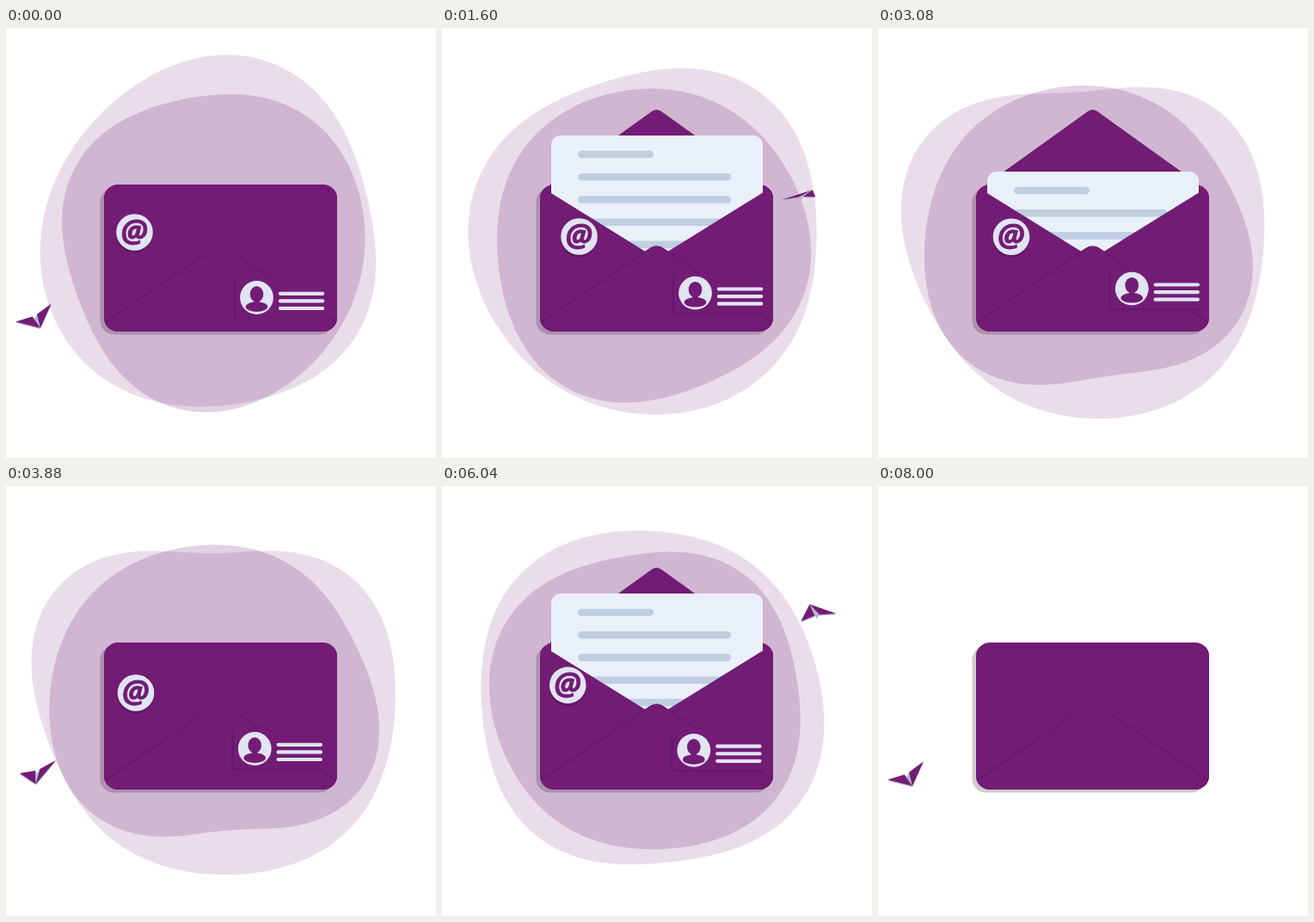
An HTML page with a canvas for the animation above (8040 ms loop, 500 by 500 pixels).

```html
<!DOCTYPE html>
<html lang="en">
<head>
<meta charset="utf-8">
<title>Mail loop</title>
<style>
html, body { margin: 0; width: 100%; height: 100%; overflow: hidden; background: #fff; }
canvas { display: block; width: 500px; height: 500px; }
</style>
</head>
<body>
<canvas id="stage"></canvas>
<script>
const LOOP = 8040, STEP = 40, CYCLE = 4000, DRIFT = 8000, TAU = Math.PI * 2;
const PURPLE = '#721c75', DARK = '#601662', PALE = '#e1e4f3', PAPER = '#eaf0fa';

const canvas = document.getElementById('stage');
const ratio = window.devicePixelRatio || 1;
canvas.width = canvas.height = 500 * ratio;
const ctx = canvas.getContext('2d');

// Outline waves 0 to 4: each amplitude is [rest, swing by cos, swing by sin]
const OUTER = {
  cos: [[202.3, -2.3, 1.6], [-2.7, -3.8, 0], [3.2, -8, 0.5], [-2, -1, -5], [-3.8, 3, 1]],
  sin: [[0, 0, 0], [0.7, -6, 0], [1.5, -4.5, -2.5], [-1.5, 8.5, -4], [2.2, 0, 0]]
};
const INNER = {
  cos: [[181.3, -1, 2], [-3.6, 1.6, 0.8], [3.5, -8, -0.5], [0.5, -0.5, 4.5], [-2.4, 2, 0.7]],
  sin: [[0, 0, 0], [2, 5.2, 1], [0.5, -1.5, -2], [1.5, -8.2, 2], [3, 0, 0]]
};

// time, badge x, badge y, card x, card y
const FLOAT = [
  [0, 149.5, 237.5, 291.5, 313.5],
  [1600, 159.5, 242.5, 294.5, 308.2],
  [3080, 155, 242.7, 295.2, 303.2],
  [3880, 151, 240.5, 289.2, 305.5],
  [5040, 136.7, 236, 293.2, 308.3],
  [7040, 157, 229.3, 291.7, 307]
];

// time, x, y, pitch, bank
const FLIGHT = [
  [0, 32, 331, -2, 9],
  [200, 30, 333, -2, 9],
  [1040, 255, 281.5, -12, 5],
  [1600, 414.5, 198, 9, -5],
  [1950, 452, 150, 5, -3],
  [2700, 270, 215, 0, 0],
  [3450, 95, 295, 0, 6],
  [3880, 37, 326.5, 0, 8]
];

const clamp = v => Math.max(0, Math.min(1, v));
const mix = (a, b, u) => a + (b - a) * u;
const span = (t, from, to) => clamp((t - from) / (to - from));
const ease = u => u < 0.5 ? 4 * u ** 3 : 1 - 4 * (1 - u) ** 3;

// Smooth periodic curve through unevenly spaced keys
function sample(keys, t, period) {
  const n = keys.length;
  const key = i => keys[(i + n) % n];
  const time = i => key(i)[0] + Math.floor(i / n) * period;
  let i = n - 1;
  while (i > 0 && keys[i][0] > t) i--;
  const d = time(i + 1) - time(i), u = (t - time(i)) / d;
  const u2 = u * u, u3 = u2 * u;
  const out = [];
  for (let k = 1; k < keys[0].length; k++) {
    const slope = j => (key(j + 1)[k] - key(j - 1)[k]) / (time(j + 1) - time(j - 1));
    out.push((2 * u3 - 3 * u2 + 1) * key(i)[k] + (u3 - 2 * u2 + u) * d * slope(i)
      + (3 * u2 - 2 * u3) * key(i + 1)[k] + (u3 - u2) * d * slope(i + 1));
  }
  return out;
}

function poly(points, fill) {
  ctx.beginPath();
  for (const [x, y] of points) ctx.lineTo(x, y);
  ctx.closePath();
  ctx.fillStyle = fill;
  ctx.fill();
}

function box(x, y, w, h, r, fill) {
  ctx.beginPath();
  ctx.roundRect(x, y, w, h, r);
  ctx.fillStyle = fill;
  ctx.fill();
}

function oval(x, y, rx, ry, fill) {
  ctx.beginPath();
  ctx.ellipse(x, y, rx, ry, 0, 0, TAU);
  ctx.fillStyle = fill;
  ctx.fill();
}

function blob(shape, t, alpha) {
  const c = Math.cos(TAU * t / DRIFT), s = Math.sin(TAU * t / DRIFT);
  const now = waves => waves.map(([rest, byCos, bySin]) => rest + byCos * c + bySin * s);
  const a = now(shape.cos), b = now(shape.sin);
  const points = [];
  for (let q = 0; q < TAU; q += 0.05) {
    let r = 0;
    for (let k = 0; k < a.length; k++) r += a[k] * Math.cos(k * q) + b[k] * Math.sin(k * q);
    points.push([244 + r * Math.cos(q), 248 + r * Math.sin(q)]);
  }
  poly(points, `rgba(113,27,117,${alpha})`);
}

// A flat dart circling on a tilted plane
function plane(t) {
  const [x, y, pitch, bank] = sample(FLIGHT, t, CYCLE);
  const turn = TAU * t / CYCLE;
  const yaw = 1.4 - turn - 0.17 * Math.sin(turn);
  const fx = 47 * Math.cos(yaw), fy = 20 * Math.sin(yaw) + pitch;
  const sx = -21 * Math.sin(yaw), sy = 9 * Math.cos(yaw) + bank;
  const at = (f, s) => [x + fx * f + sx * s, y + fy * f + sy * s];
  const nose = at(1, 0), p = at(0.17, 0.13), q = at(0.17, -0.13);
  const wings = [[nose, at(0, 1), p], [nose, at(0, -1), q]];
  for (const w of wings) poly(w.map(([px, py]) => [px, py + 1.2]), '#b7a6c3');
  const [kx, ky] = at(0.17, 0);
  poly([p, nose, q, [kx, ky + 4]], '#aebbd3');
  for (const w of wings) poly(w, PURPLE);
}

function flap(s) {
  const base = 186 - 4 * s, tip = 186 - 93 * s;
  ctx.beginPath();
  ctx.moveTo(125.5, base);
  if (Math.abs(s) > 0.15) ctx.arcTo(249.5, tip, 373.5, base, 9);
  else ctx.lineTo(249.5, tip);
  ctx.lineTo(373.5, base);
  ctx.closePath();
  ctx.fillStyle = PURPLE;
  ctx.fill();
}

function letter(t) {
  const shown = t < 2000 ? ease(span(t, 530, 1130)) : 1 - ease(span(t, 2900, 3330));
  if (shown <= 0) return;
  const top = mix(268, 125, shown);
  box(127, top, 246, 335 - top, [11, 11, 0, 0], PAPER);
  const tint = span(t, 1060, 1560);
  const color = `rgb(${mix(213, 191, tint)},${mix(203, 206, tint)},${mix(224, 225, tint)})`;
  ctx.save();
  ctx.beginPath();
  ctx.rect(127, top, 246, 335 - top);
  ctx.clip();
  for (let i = 0; i < 5; i++) {
    const start = 728 + 165 * i;
    const w = (i ? 178 : 88) * span(t, start, start + 165);
    if (w > 0) box(158, top + 17.8 + 26.2 * i, Math.max(w, 8.5), 8.5, 4.25, color);
  }
  ctx.restore();
}

function pocket() {
  ctx.save();
  ctx.beginPath();
  ctx.roundRect(114, 182, 271, 171, 16);
  ctx.clip();
  poly([[114, 184], [249.5, 268], [385, 184], [385, 353], [114, 353]], PURPLE);
  ctx.beginPath();
  ctx.moveTo(114, 343);
  ctx.arcTo(249.5, 251, 385, 343, 14);
  ctx.lineTo(385, 343);
  ctx.fillStyle = PURPLE;
  ctx.fill();
  ctx.strokeStyle = DARK;
  ctx.lineWidth = 1.1;
  ctx.stroke();
  ctx.restore();
}

function badge(x, y) {
  oval(x - 0.5, y + 3, 21.2, 21, DARK);
  oval(x, y, 21.3, 21.3, PALE);
  ctx.font = 'italic 700 36px "Open Sans", "Noto Sans", sans-serif';
  const m = ctx.measureText('@');
  const left = x + (m.actualBoundingBoxLeft - m.actualBoundingBoxRight) / 2;
  const base = y + (m.actualBoundingBoxAscent - m.actualBoundingBoxDescent) / 2;
  ctx.fillStyle = ctx.strokeStyle = PURPLE;
  ctx.lineWidth = 0.8;
  ctx.fillText('@', left, base);
  ctx.strokeText('@', left, base);
}

function card(x, y) {
  ctx.save();
  ctx.beginPath();
  ctx.rect(114, 182, 270, 155);
  ctx.clip();
  box(x - 27, y - 21, 109, 46, 3, '#66186a');
  box(x - 24.5, y - 23, 120, 46, 3, PURPLE);
  ctx.restore();
  oval(x, y, 19.4, 19.4, PALE);
  oval(x, y + 10.6, 12.8, 5.8, PURPLE);
  oval(x, y - 4, 7.8, 9.3, PURPLE);
  ctx.fillRect(x - 3, y + 3, 6, 4);
  for (let i = 0; i < 3; i++) box(x + 25.3, y - 6.8 + 8.6 * i, 53.5, 4.2, 2.1, PALE);
}

function draw(t) {
  const phase = t % CYCLE;
  const behind = phase > 1950 && phase < 3950;
  const drifting = t < DRIFT;
  const open = phase < 2000
    ? ease(span(phase, 250, 560)) * 2 - 1
    : 1 - 2 * ease(span(phase, 3300, 3600));

  ctx.setTransform(ratio, 0, 0, ratio, 0, 0);
  ctx.fillStyle = '#fff';
  ctx.fillRect(0, 0, 500, 500);
  if (drifting) {
    blob(OUTER, t, 0.15);
    blob(INNER, t, 0.2);
  }
  if (behind) plane(phase);
  box(109.5, 186, 271, 170.5, 16, 'rgba(30,10,30,0.21)');
  if (open > 0) flap(open);
  box(114, 182, 271, 171, 16, PURPLE);
  letter(phase);
  pocket();
  if (open <= 0) flap(open);
  if (drifting) {
    const [bx, by, cx, cy] = sample(FLOAT, t, DRIFT);
    badge(bx, by);
    card(cx, cy);
  }
  if (!behind) plane(phase);
}

let start = null;
function tick(now) {
  if (start === null) start = now;
  draw(Math.floor(((now - start) % LOOP) / STEP) * STEP);
  requestAnimationFrame(tick);
}
draw(0);
requestAnimationFrame(tick);
</script>
</body>
</html>
```
